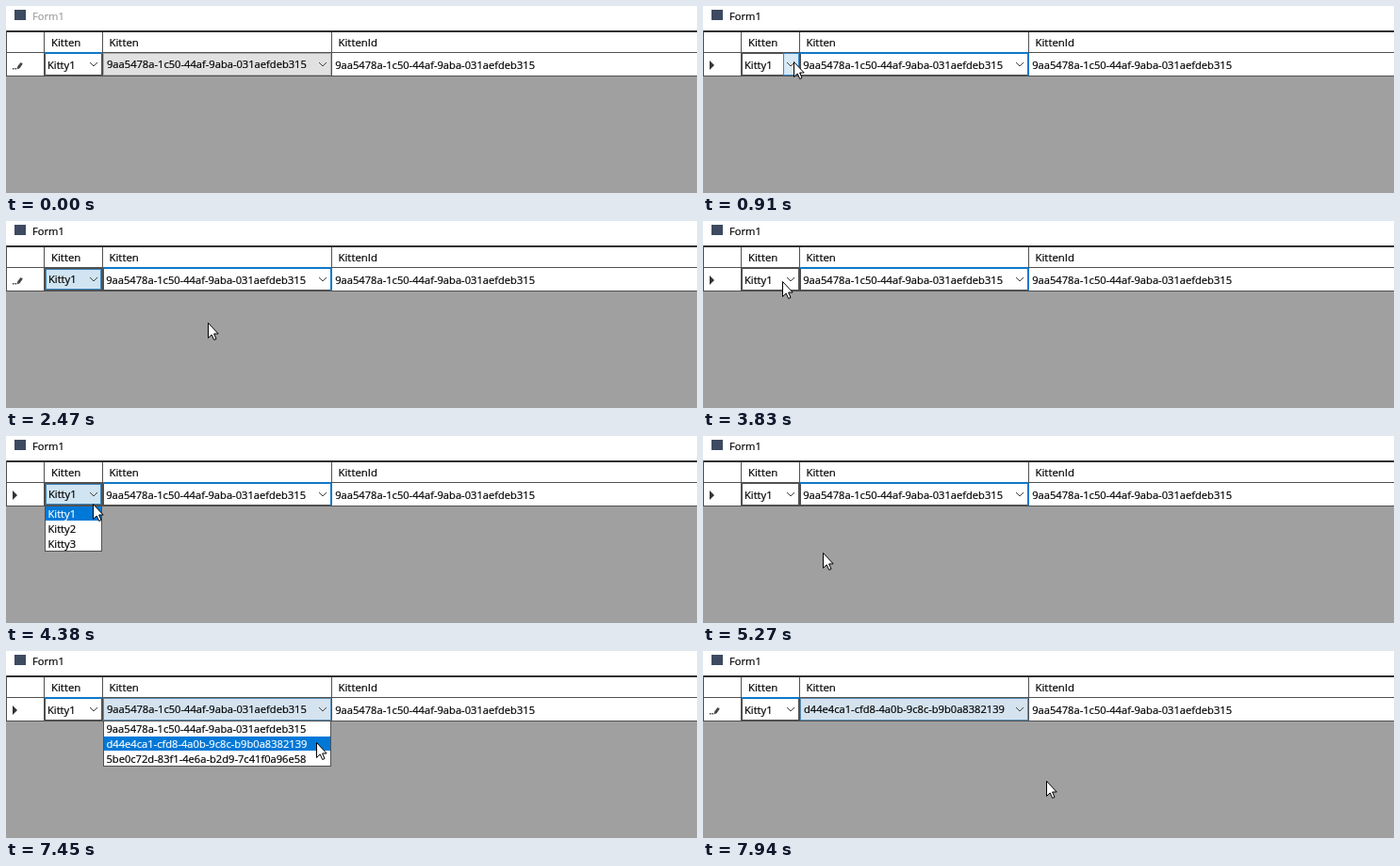
An HTML page for the animation above (8 s loop, 733 by 199 pixels).

```html
<!DOCTYPE html>
<html lang="en">
<head>
<meta charset="utf-8">
<title>Form1</title>
<style>
  html, body { margin: 0; width: 100%; height: 100%; overflow: hidden; background: #a0a0a0; }
  svg { display: block; width: 733px; height: 199px; }
  text {
    font-family: "Open Sans", "Noto Sans", sans-serif; font-size: 11.15px;
    fill: currentColor; stroke: currentColor; stroke-width: .2; white-space: pre;
  }
  .head { font-size: 11.4px; }
  .grid { fill: none; stroke: #505050; shape-rendering: crispEdges; }
  .chevron { fill: none; stroke: #444; }
  rect { shape-rendering: crispEdges; }
</style>
</head>
<body>
<svg viewBox="0 0 733 199">
  <rect width="733" height="199" fill="#a0a0a0"/>
  <rect width="733" height="75" fill="#fff"/>
  <rect x="9" y="4" width="12" height="11" fill="#3d4a60"/>
  <text id="title" x="28" y="15">Form1</text>
  <text class="head" x="48" y="43">Kitten</text>
  <text class="head" x="109.5" y="43">Kitten</text>
  <text class="head" x="352.5" y="43">KittenId</text>
  <rect y="26" width="733" height="2" fill="#303030"/>
  <path class="grid" d="M0 49.5H733M0 74.5H733M.5 26V75M40.5 28V75M102.5 28V75M345.5 28V75"/>
  <path id="arrow" d="M7 58V68L12 63Z" fill="#333"/>
  <g id="pen">
    <path d="M7 66h1.4v1.6h-1.4zM9.4 66h1.4v1.6h-1.4z" fill="#333"/>
    <path d="M11.4 67.6L12.4 64L15.6 60L17.8 61.6L14.6 66.2Z" fill="#4c4642"/>
  </g>
  <text x="349.2" y="67">9aa5478a-1c50-44af-9aba-031aefdeb315</text>
  <g id="cells"></g>
  <g id="list"></g>
  <circle id="click" r="12" fill="#f2e21e" opacity=".65"/>
  <path id="cursor" d="M.5 .5V16.5L4.2 13L6.7 18.5L9 17.5L6.6 12H11.2Z" fill="#fff" stroke="#000"/>
</svg>
<script>
const LOOP = 8000;
const WAKE = 130;    // the form becomes active
const PRESS = 140;   // how long a click shows
const REACT = 75;    // delay between a click and its effect
const BLUE = "#0f78c8";
const DARK = "#505050";

const names = ["Kitty1", "Kitty2", "Kitty3"];
const ids = [
  "9aa5478a-1c50-44af-9aba-031aefdeb315",
  "d44e4ca1-cfd8-4a0b-9c8c-b9b0a8382139",
  "5be0c72d-83f1-4e6a-b2d9-7c41f0a96e58"
];

// Each pick opens a drop-down, chooses an item and later commits the edit
const picks = [
  { column: "name", press: 1440, choose: 2000, commit: 3020 },
  { column: "name", press: 4040, choose: 4650, commit: 5270 },
  { column: "id", press: 7170, choose: 7555, commit: LOOP }
];
const [first, second, third] = picks;
const clicks = [6430, 6830, ...picks.flatMap(p => [p.press, p.choose])];

const home = { x: 200, y: 151 };
const moves = [
  { from: 200, to: 910, x: 97, y: 59 },
  { from: first.press + PRESS, to: first.choose, x: 93, y: 83 },
  { from: first.choose + REACT, to: 2690, x: 221, y: 109 },
  { from: 3410, to: 3830, x: 85, y: 64 },
  { from: 3900, to: second.press, x: 94, y: 61 },
  { from: 4310, to: second.choose, x: 92, y: 83 },
  { from: second.choose + REACT, to: 4940, x: 128, y: 124 },
  { from: 5600, to: 6290, x: 332, y: 60, bow: 30 },
  { from: 6900, to: 6970, x: 335, y: 60 },
  { from: third.press + REACT, to: third.choose, x: 330, y: 98 },
  { from: third.choose + REACT, to: 7940, x: 365, y: 138 }
];

const $ = id => document.getElementById(id);
const clamp = (v, lo, hi) => Math.max(lo, Math.min(hi, v));
const easeOut = k => 1 - (1 - k) ** 3;
const show = (el, on) => el.setAttribute("visibility", on ? "visible" : "hidden");
const rect = (x, y, w, h, fill, stroke = "none") =>
  `<rect x="${x}" y="${y}" width="${w}" height="${h}" fill="${fill}" stroke="${stroke}"/>`;
const text = (x, y, s, color = "#000") => `<text x="${x}" y="${y}" color="${color}">${s}</text>`;
const chevron = x => `<path class="chevron" d="M${x - 4} 60L${x} 64L${x + 4} 60"/>`;
const hotButton = x => rect(x + .5, 50.5, 16, 23, "#d9e9f6", "#3a87c8");

function pointer(t) {
  let { x, y } = home;
  for (const m of moves) {
    if (t < m.from) break;
    const k = easeOut(clamp((t - m.from) / (m.to - m.from), 0, 1));
    x += (m.x - x) * k;
    y += (m.y - y) * k + (m.bow || 0) * Math.sin(Math.PI * k);
  }
  return { x: Math.round(x), y: Math.round(y) };
}

function nameCell(editing, hot, focused) {
  let s = rect(41.5, 50.5, 60, 23, "#fff", DARK);
  if (editing) s += rect(42.5, 51.5, 58, 21, "#d0e4f2", "#3f86bb");
  else if (hot) s += hotButton(85);
  if (focused) s += rect(41, 49, 61, 2, BLUE);
  return s + (editing ? text(45, 66, names[0]) : text(44, 67, names[0])) + chevron(93);
}

function idCell(look, hot, value) {
  if (look) {
    return rect(103.5, 50.5, 241, 23, look.fill, look.edge) + text(107, 66, value) + chevron(336);
  }
  const s = rect(103.5, 50.5, 241, 23, "#fff", DARK)
    + rect(103, 49, 242, 2, BLUE) + rect(344, 50, 2, 24, BLUE);
  return s + (hot ? hotButton(328) : "") + text(106.2, 67, value) + chevron(336);
}

function dropList(x, w, items, y) {
  const hover = clamp(Math.floor((y - 75) / 16), 0, items.length - 1);
  const row = (s, i) => {
    const on = i === hover, top = 75 + i * 16;
    return (on ? rect(x + 1, top, w - 2, 15, "#0078d7") : "")
      + text(x + 3.5, top + 12, s, on ? "#fff" : "#000");
  };
  return rect(x + .5, 74.5, w - 1, 48, "#fff", DARK) + items.map(row).join("");
}

function draw(t) {
  const { x, y } = pointer(t);
  const awake = t >= WAKE;
  const edit = picks.find(p => t >= p.press + REACT && t < p.commit);
  const editing = column => edit !== undefined && edit.column === column;
  const chosen = edit !== undefined && t >= edit.choose + REACT;
  const pen = !awake || chosen;
  const over = (a, b) => y > 49 && y < 74 && x > a && x < b;

  $("title").setAttribute("color", awake ? "#000" : "#9c9f9a");
  show($("pen"), pen);
  show($("arrow"), !pen);

  const look = !awake ? { fill: "#e1e1e1", edge: "#adadad" }
    : editing("id") ? { fill: "#d5e3ef", edge: "#5a8fb8" } : null;
  const value = ids[editing("id") && chosen ? 1 : 0];
  $("cells").innerHTML =
    nameCell(editing("name"), over(85, 102), !awake || t >= third.press)
    + idCell(look, over(327, 345), value);

  $("list").innerHTML = !edit || chosen ? ""
    : editing("name") ? dropList(41, 61, names, y) : dropList(103, 242, ids, y);

  show($("click"), clicks.some(c => t >= c && t < c + PRESS));
  $("click").setAttribute("cx", x);
  $("click").setAttribute("cy", y + .5);
  show($("cursor"), awake);
  $("cursor").setAttribute("transform", `translate(${x - 1} ${y})`);
}

const start = performance.now();
function tick() {
  draw((performance.now() - start) % LOOP);
  requestAnimationFrame(tick);
}
tick();
</script>
</body>
</html>
```
